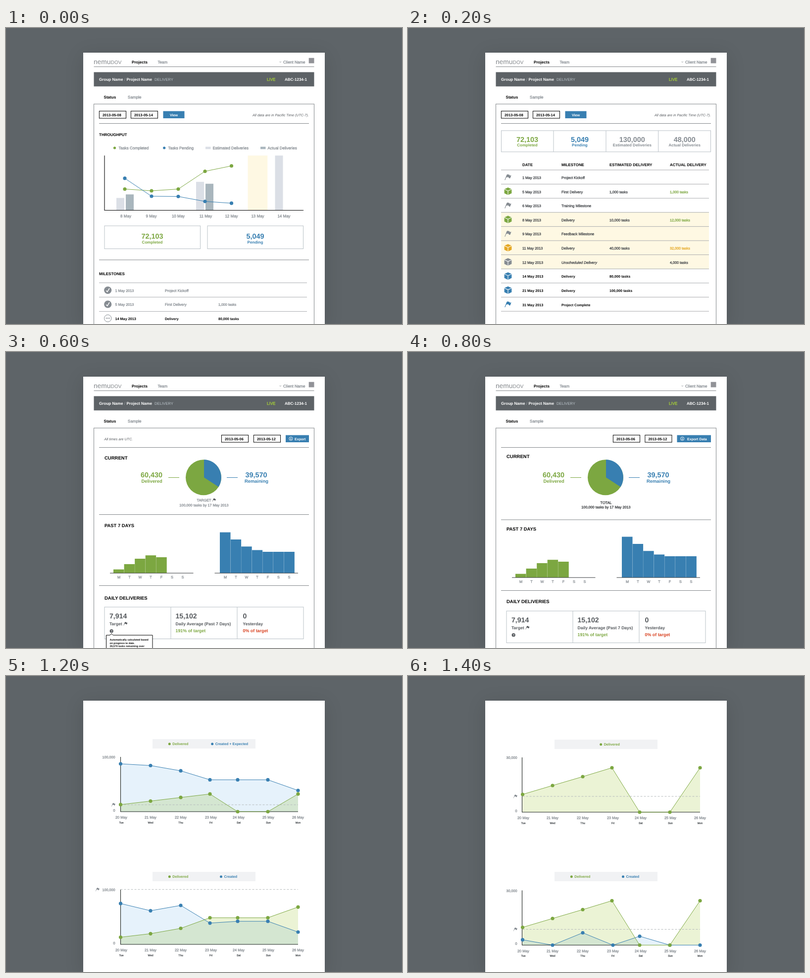
An HTML page for the animation above (1.6 s loop, 800 px wide and 600 px high).

```html
<!DOCTYPE html>
<html lang="en">
<head>
<meta charset="utf-8">
<title>Project dashboard</title>
<style>
html, body { margin: 0; width: 100%; height: 100%; overflow: hidden; background: #5e6468; }
.stage { position: relative; width: 100%; height: 100%; overflow: hidden; contain: strict; }
svg { display: block; position: absolute; left: 0; top: 0; width: 100%; height: 100%; overflow: hidden; }
.sheet { position: absolute; left: 156px; top: 50px; width: 488px; bottom: 0; background: #fff; box-shadow: 0 6px 36px rgba(0, 0, 0, .13); }
text { font-family: "Liberation Sans", Arial, Helvetica, sans-serif; text-rendering: geometricPrecision; white-space: pre; }
.b { font-weight: 700; }
.i { font-style: italic; }
.m { stroke-width: .3; }
.logo { font-family: Lato, sans-serif; }
.mix { mix-blend-mode: multiply; }
.scene { visibility: hidden; animation: show 1600ms step-end infinite; }
@keyframes show {
  0% { visibility: visible; }
  12.5%, 100% { visibility: hidden; }
}
</style>
</head>
<body>
<div class="stage">
  <div class="sheet"></div>
  <svg id="art" viewBox="0 0 800 600"></svg>
</div>
<script>
const GREEN = '#7ca741', BLUE = '#387fb1', GREY = '#868c92', DARK = '#55595d', INK = '#000', RULE = '#84888b', BORDER = '#b9c1c7', YELLOW = '#e5a824', CREAM = '#fef8e3';
const PALE = { [GREEN]: '#ebf3d5', [BLUE]: '#e6f2fb' };
const XS = [231.5, 292, 353, 412, 468, 529, 590];
const LABEL_XS = [233, 292, 353, 414, 470, 530, 590];

const text = (x, y, str, size, fill = INK, cls = 'b', anchor = 'start') =>
  `<text x="${x}" y="${y}" font-size="${size}" fill="${fill}" class="${cls}" text-anchor="${anchor}"${/m/.test(cls) ? ` stroke="${fill}"` : ''}>${str}</text>`;
const mid = (x, y, str, size, fill, cls) => text(x, y, str, size, fill, cls, 'middle');
const end = (x, y, str, size, fill, cls) => text(x, y, str, size, fill, cls, 'end');
const rect = (x, y, x2, y2, fill, stroke = 'none') =>
  `<rect x="${x}" y="${y}" width="${x2 - x}" height="${y2 - y}" fill="${fill}" stroke="${stroke}"/>`;
const path = (d, stroke, width = 1, fill = 'none', extra = '') =>
  `<path d="${d}" stroke="${stroke}" stroke-width="${width}" fill="${fill}" ${extra}/>`;
const rule = (y, x = 188, x2 = 612, color = RULE) => path(`M${x} ${y}H${x2}`, color);
const dot = (x, y, r, fill) => `<circle cx="${x}" cy="${y}" r="${r}" fill="${fill}"/>`;
const join = (list, fn) => list.map(fn).join('');

const flag = (x, y, fill = GREY, k = 1) => `<g transform="translate(${x} ${y}) scale(${k})">` +
  path('M-6.3 6L-2 -4.5', fill, 1.1) +
  path('M-2.2 -5C0 -7 1.3 -4.2 3 -5L3.3 -3.6C4.5 -3 5.5 -3.4 6.6 -3.8L4.6 2C3 3 2 2.4 1.6 .8C0 -.4 -2 -.2 -4 1Z', 'none', 0, fill) + '</g>';

const cube = (x, y, fill) => `<g transform="translate(${x} ${y})">` +
  path('M0 -7.6L7.4 -4.3V4L0 7.6L-7.4 4V-4.3Z', 'none', 0, fill) +
  path('M-7.4 -4.1L0 -.8L7.4 -4.1M0 -.8V7.6', '#fff', 1.1) + '</g>';

function header() {
  return text(177, 72.5, 'nemu<tspan font-size="9.8">DOV</tspan>', 14, '#85898d', 'logo') +
    text(254, 72, 'Projects', 8.1) + text(306.5, 72, 'Team', 8.1, GREY, 'm') +
    path('M552.5 68L554.2 69.7L555.9 68', GREY, .9) +
    text(560, 72, 'Client Name', 8.1, GREY, 'm') +
    rect(611.7, 60.7, 622.5, 71.5, '#919297') + rule(78.5, 177.5, 622.5) +
    rect(177.5, 89.5, 622.5, 118.4, '#5d6266') +
    text(188, 107, 'Group Name', 8.1, '#fff') + text(239, 107, '/', 8, '#a4a9ad', '') +
    text(243.5, 107, 'Project Name', 8.05, '#fff') + text(300, 107, 'DELIVERY', 7.7, '#bcc5cb', '') +
    text(527, 107, 'LIVE', 8, '#a6cf38', 'm') + text(563, 107, 'ABC-1234-1', 8, '#fff') +
    text(197.5, 143, 'Status', 8.1) + text(246, 143, 'Sample', 8.1, GREY, 'm') +
    rect(177.5, 154.1, 622.5, 602, 'none', RULE) + rule(193.5);
}

const dateBox = (x, date) => rect(x + .4, 168.4, x + 54.5, 183, '#fff', INK) + text(x + 7, 179, date, 7.4);

const viewBar = () => dateBox(188, '2013-05-08') + dateBox(252, '2013-05-14') +
  rect(317.5, 168.5, 360.5, 183, BLUE) + mid(339, 179, 'View', 7.2, '#fff') +
  end(611.5, 179, 'All data are in Pacific Time (UTC-7).', 7.1, DARK, 'i');

const exportBtn = (x, label, iconX, textX) => rect(x, 168.5, 612, 183, BLUE) +
  `<circle cx="${iconX}" cy="175.7" r="3.6" fill="none" stroke="#fff" stroke-width=".9"/>` +
  path(`M${iconX} 173.6V177.4M${iconX - 1.5} 176L${iconX} 177.6L${iconX + 1.5} 176`, '#fff', .8) +
  text(textX, 179, label, 7.1, '#fff');

const line = (xs, ys) => 'M' + xs.map((x, i) => `${x} ${ys[i]}`).join('L');
const plot = (xs, ys, color, r = 3.6) => path(line(xs, ys), color) + join(xs, (x, i) => dot(x, ys[i], r, color));

function throughput() {
  const xs = [240, 294, 348, 402, 455.5];
  const light = '#dbdfe6', deep = '#a9b6bd';
  const legend = [['Tasks Completed', 227.5], ['Tasks Pending', 327.5], ['Estimated Deliveries', 417.5], ['Actual Deliveries', 528.5]];
  const card = (x, num, label, color) => rect(x + .5, 401, x + 194, 447.5, '#fff', BORDER) +
    mid(x + 97, 427, num, 14.4, color) + mid(x + 97, 437, label, 8.1, color);
  const row = (y, cls, color, date, name, tasks) => text(220.5, y, date, 7.25, color, cls) +
    text(321, y, name, cls === 'b' ? 7.1 : 7.5, color, cls) + text(429, y, tasks, 7.1, color, cls);
  const tick = y => dot(205.7, y, 7.6, GREY) + path(`M202.3 ${y + .8}L204.7 ${y + 3.3}L209 ${y - 3.8}`, '#fff', 1.6);
  return header() + viewBar() + text(188, 219, 'THROUGHPUT', 8) +
    dot(219.5, 243, 2.6, GREEN) + dot(319.7, 243, 2.6, BLUE) +
    rect(403, 240.7, 413.5, 245.5, light) + rect(514, 240.7, 524.5, 245.5, deep) +
    join(legend, ([s, x]) => text(x, 246, s, 7.95, GREY, 'm')) +
    rect(223, 344.5, 239, 369.5, light) + rect(242, 337.3, 258, 369.5, deep) +
    rect(384, 311.8, 400, 369.5, light) + rect(403, 315.7, 419, 369.5, deep) +
    rect(488.5, 258.5, 528.3, 369.5, CREAM) + rect(543.5, 258.5, 559.5, 369.5, light) +
    path('M199 258.5V369.5H601', INK, 1.1) +
    plot(xs, [326.5, 330, 326.5, 290.5, 279.5], GREEN) + plot(xs, [304.7, 341, 341.5, 351.5, 355.2], BLUE) +
    join([242, 293.5, 348, 403.5, 455.5, 508.5, 561.5], (x, i) => mid(x, 384, `${8 + i} May`, 8, GREY, 'm')) +
    card(198.5, '72,103', 'Completed', GREEN) + card(406.5, '5,049', 'Pending', BLUE) +
    rule(470) + text(188, 501, 'MILESTONES', 8) +
    join([516.5, 545.5, 574.5], y => rule(y, 188, 608, '#adb0b3')) +
    tick(531.5) + tick(560) +
    `<circle cx="205.7" cy="588.5" r="7.2" fill="#fff" stroke="${GREY}"/>` +
    join([202.7, 205.7, 208.7], x => dot(x, 588.3, 1.1, GREY)) +
    row(535, 'm', GREY, '1 May 2013', 'Project Kickoff', '') +
    row(563.3, 'm', GREY, '5 May 2013', 'First Delivery', '1,000 tasks') +
    row(592, 'b', INK, '14 May 2013', 'Delivery', '80,000 tasks');
}

function table() {
  const heads = [['72,103', 'Completed', GREEN], ['5,049', 'Pending', BLUE], ['130,000', 'Estimated Deliveries', GREY], ['48,000', 'Actual Deliveries', GREY]];
  const rows = [
    [1, 'Project Kickoff', '', '', GREY, flag],
    [5, 'First Delivery', '1,000', '1,000', GREEN, cube],
    [6, 'Training Milestone', '', '', GREY, flag],
    [8, 'Delivery', '10,000', '12,000', GREEN, cube],
    [9, 'Feedback Milestone', '', '', GREY, flag],
    [11, 'Delivery', '40,000', '32,000', YELLOW, cube],
    [12, 'Unscheduled Delivery', '', '4,000', GREY, cube],
    [14, 'Delivery', '80,000', '', BLUE, cube],
    [21, 'Delivery', '100,000', '', BLUE, cube],
    [31, 'Project Complete', '', '', BLUE, flag]
  ];
  const top = 287.8, step = 28.64, dark = '#404448';
  const tasks = n => n && n + ' tasks';
  return header() + viewBar() + rect(188.5, 208, 611.5, 251, '#fff', BORDER) +
    join([294, 400, 505.7], x => path(`M${x} 208V251`, BORDER)) +
    join(heads, ([n, s, c], i) => mid(241 + 105.9 * i, 231, n, 14.4, c) + mid(241 + 105.9 * i, 240.3, s, 8, c)) +
    text(231, 280, 'DATE', 7.9) + text(310, 280, 'MILESTONE', 7.9) +
    text(407, 280, 'ESTIMATED DELIVERY', 7.9) + text(529, 280, 'ACTUAL DELIVERY', 7.9) +
    rect(188, top + 3 * step, 608, top + 7 * step, CREAM) +
    join([...rows.keys(), 10], i => rule(top + i * step, 188, 608, '#aaacae')) +
    join(rows, ([day, name, est, act, color, icon], i) => {
      const y = top + i * step + 18.1, bold = i > 6, cls = bold ? 'b' : 'm', ink = bold ? INK : dark;
      return icon(202, y - 3.6, color) +
        text(231, y, `${day} May 2013`, 7.25, ink, cls) +
        text(310, y, name, bold ? 7.1 : 7.4, ink, i === 6 ? 'i m' : cls) +
        text(407, y, tasks(est), 7.2, ink, cls) +
        text(529, y, tasks(act), 7.2, color === GREY ? dark : color, 'm');
    });
}

function pie() {
  const a = 122 * Math.PI / 180, r = 36, cy = 254.3;
  return dot(399, cy, r, GREEN) +
    path(`M400 ${cy}V${cy - r}A35 36 0 0 1 ${399 + r * Math.sin(a)} ${cy - r * Math.cos(a)}Z`, 'none', 0, BLUE) +
    rule(254.5, 328, 350, GREEN) + rule(254.5, 446, 468, BLUE) +
    end(316, 254, '60,430', 14.4, GREEN) + end(315.7, 265, 'Delivered', 9.4, GREEN) +
    text(483.5, 254, '39,570', 14.4, BLUE) + text(482, 265, 'Remaining', 9.4, BLUE);
}

const target = () => mid(400, 303, 'TARGET', 7.3, GREY, 'm') + flag(420.5, 300, DARK, .55) +
  mid(400, 313, '100,000 tasks by 17 May 2013', 7.3, GREY, 'm');

function bars(dy) {
  const w = 21.55;
  const set = (axisX, x, tops, color) =>
    join(tops, (y, i) => rect(x + i * w, y, x + (i + 1) * w, 448, color) + (i ? path(`M${x + i * w} ${y}V448`, '#fff', .15) : '')) +
    rule(448.2, axisX, axisX + 168.5, '#3a3d40') +
    join([...'MTWTFSS'], (s, i) => mid(x + 11 + i * 21.5, 459, s, 7.4, GREY, 'm'));
  return `<g transform="translate(0 ${dy})">` + set(210, 217, [440.7, 430, 419, 412.2, 416], GREEN) +
    set(421.5, 432, [365.5, 380, 394.3, 401.5, 405, 405, 405], BLUE) + '</g>';
}

function daily(titleY, top) {
  const box = (x, num, label, note = '', color) => text(x, top + 23, num, 14.1, DARK) +
    text(x, top + 37.3, label, 8.55, DARK) + text(x, top + 51.3, note, 8.9, color);
  return text(199, titleY, 'DAILY DELIVERIES', 9.5) + rect(199, top, 601, top + 64.5, '#fff', BORDER) +
    path(`M333 ${top}v64.5M467 ${top}v64.5`, BORDER) +
    box(209, '7,914', 'Target') + flag(241.5, top + 33.8, DARK, .6) +
    dot(213.2, top + 48.7, 3.6, DARK) + mid(213.2, top + 50.8, '?', 5.8, '#fff') +
    box(342.5, '15,102', 'Daily Average (Past 7 Days)', '191% of target', GREEN) +
    box(478.5, '0', 'Yesterday', '0% of target', '#d8401f');
}

function overview() {
  const tip = ['Automatically calculated based', 'on progress to date.', '39,570 tasks remaining over'];
  return header() + text(198.5, 179, 'All times are UTC.', 7.1, DARK, 'i') +
    dateBox(435, '2013-05-06') + dateBox(500, '2013-05-12') + exportBtn(565, 'Export', 575.5, 583) +
    text(199, 218, 'CURRENT', 9.5) + pie() + target() + rule(329.5) +
    text(199, 355, 'PAST 7 DAYS', 9.4) + bars(0) + rule(473.5) + daily(502, 517) +
    path('M202.5 602V574H210L213.2 570.8L216.4 574H296V602', INK, 1, '#fff') +
    join(tip, (s, i) => text(209.5, 585 + i * 6.5, s, 5.25));
}

const total = () => header() + dateBox(414, '2013-05-06') + dateBox(478.5, '2013-05-12') +
  exportBtn(543.5, 'Export Data', 554.2, 564) + text(199, 215, 'CURRENT', 9.5) + pie() +
  mid(400, 308, 'TOTAL', 7.3, '#35383b', 'm') +
  mid(400, 317, '100,000 tasks by 17 May 2013', 7.3, '#35383b', 'm') +
  rule(340) + text(199, 362, 'PAST 7 DAYS', 9.4);

// series: list of [color, ys, xs]
function chart({ top, base, dash, max, first, week, series, axisX = 231.5, flagX = 217 }) {
  const area = ([color, ys, xs = XS]) => '<g class="mix">' +
    path(`${line(xs, ys)}V${base}H${xs[0]}Z`, 'none', 0, PALE[color]) + '</g>';
  return join(series, area) +
    path(`M${axisX} ${top}V${base}H590`, '#1d2420', 1.1) +
    path(`M231.5 ${dash}H590`, '#b4b9bb', 1, 'none', 'stroke-dasharray="4 3"') +
    join(series, ([color, ys, xs = XS]) => plot(xs, ys, color)) +
    end(220.5, top + 3.3, max, 7.2, GREY, 'm') + end(220.5, base - .3, '0', 7.2, GREY, 'm') +
    flag(flagX, dash, GREY, .6) +
    join(LABEL_XS, (x, i) => mid(x, base + 14.3, `${first + i} May`, 7.35, GREY, 'm') +
      mid(x, base + 23.9, week[i], 5.4, DARK, 'm'));
}

const legend = (y, items) => rect(296, y, 504, y + 19, '#f1f2f4') +
  join(items, ([x, s, color]) => dot(x, y + 9.7, 2.5, color) + text(x + 6, y + 12.2, s, 7.15, color));

const fromMon = ['Mon', 'Tue', 'Wed', 'Thu', 'Fri', 'Sat', 'Sun'];
const fromTue = ['Tue', 'Wed', 'Thu', 'Fri', 'Sat', 'Sun', 'Mon'];
const late = { first: 20, week: fromTue };

const trend = () => total() + chart({
  top: 384, base: 495.5, dash: 451.5, max: '40,000', first: 6, week: fromMon,
  series: [[BLUE, [384, 387.5, 398.3, 416, 437.8, 437.8, 437.8]], [GREEN, [484.5, 481, 470, 441, 409, 495.2, 495.2]]]
}) + rule(531.5) + daily(554, 571);

const compare = () => legend(128, [[330.3, 'Delivered', GREEN], [416.7, 'Created + Expected', BLUE]]) +
  chart({ ...late, top: 164, base: 275, dash: 261, max: '100,000',
    series: [[BLUE, [178, 181.5, 192.2, 210.4, 210.4, 210.4, 232]], [GREEN, [260.7, 253.5, 246.2, 239.2, 275, 275, 239.2]]] }) +
  legend(397, [[330.3, 'Delivered', GREEN], [434.5, 'Created', BLUE]]) +
  chart({ ...late, top: 433, base: 544, dash: 432.7, max: '100,000', flagX: 185,
    series: [[BLUE, [461.2, 475.8, 465, 500.8, 497.2, 497.2, 519]], [GREEN, [529.5, 522.3, 511.5, 490, 490, 490, 468.3]]] });

function delivered() {
  const ys = [240, 222, 204, 186, 276, 276, 186];
  const blueXs = XS.map((x, i) => i === 3 ? 414 : x);
  return legend(129, [[389.7, 'Delivered', GREEN]]) +
    chart({ ...late, top: 165, base: 276, dash: 244, max: '30,000', axisX: 230.5, series: [[GREEN, ys]] }) +
    legend(397, [[330.3, 'Delivered', GREEN], [434.5, 'Created', BLUE]]) +
    chart({ ...late, top: 434.5, base: 545.5, dash: 513.5, max: '30,000', axisX: 230.5,
      series: [[BLUE, [534.7, 545.5, 520.5, 545.5, 527.5, 545.5, 545.5], blueXs], [GREEN, ys.map(y => y + 269.5)]] });
}

const scenes = [
  throughput, table,
  () => pie() + target() + bars(0),
  overview,
  () => total() + bars(9) + rule(483.5) + daily(509, 525),
  trend, compare, delivered
];
document.getElementById('art').innerHTML = join(scenes, (draw, i) =>
  `<g class="scene" style="animation-delay:${i * 200 - (i && 1600)}ms">${draw()}</g>`);
</script>
</body>
</html>
```
